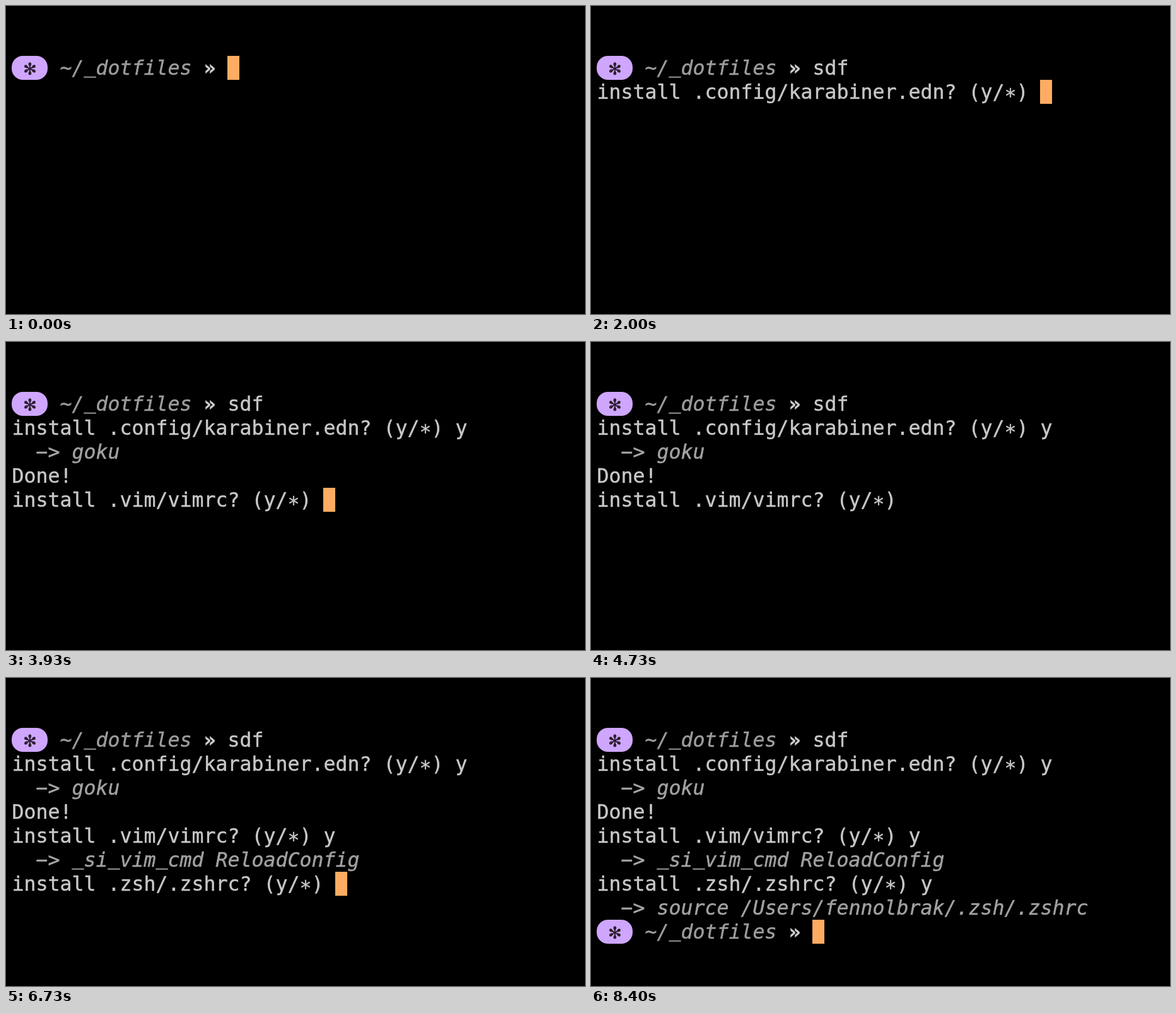
These frames come from a looping animation (918 px wide and 488 px high, 8470 ms). An HTML page:

```html
<!DOCTYPE html>
<html lang="en">
<head>
<meta charset="utf-8">
<title>Terminal session</title>
<style>
  html, body { margin: 0; width: 100%; height: 100%; overflow: hidden; background: #000; }
  svg { display: block; width: 918px; height: 488px; }
  text {
    font: 31.56px "DejaVu Sans Mono", monospace;
    font-variant-ligatures: none;
    white-space: pre;
    color: #c8c8c8;
    fill: currentColor;
    stroke: currentColor;
    stroke-width: .45px;
  }
  .path { font-style: italic; color: #9d9d9d; }
  .command { font-style: italic; color: #a2a2a2; }
  .arrow { color: #a8a8a8; }
  .mark { font-weight: bold; color: #cecece; }
  .star { color: #2b1f2c; }
  .pill { fill: #cfa6fd; }
  .cursor { fill: #ffac62; }
</style>
</head>
<body>
<svg id="screen" viewBox="0 0 918 488"></svg>
<script>
const LOOP = 8470;
const KEY = 133;   // time between key presses
const IDLE = 670;  // time before a waiting cursor blinks
const CELL = { w: 19, h: 38, left: 9, top: 79, baseline: 30 };
const GLYPH_DROP = { '*': 6, '_': -3 };

const screen = document.getElementById('screen');
const cursorSteps = new Map();
let now = 0, row = 0, col = 0;

const x = () => CELL.left + col * CELL.w;
const y = () => CELL.top + row * CELL.h;

function add(tag, attrs, content = '') {
  const node = document.createElementNS('http://www.w3.org/2000/svg', tag);
  for (const name in attrs) node.setAttribute(name, attrs[name]);
  node.textContent = content;
  screen.append(node);
  return node;
}

// Plays [time, style] steps as hard changes, holding the last one to the loop's end.
function playSteps(node, steps) {
  const frames = steps.map(([time, style]) => ({ ...style, offset: time / LOOP, easing: 'step-end' }));
  frames.push({ ...steps.at(-1)[1], offset: 1 });
  node.animate(frames, { duration: LOOP, iterations: Infinity });
}

function appear(node) {
  if (now > 0) playSteps(node, [[0, { opacity: 0 }], [now, { opacity: 1 }]]);
}

function markCursor(opacity = 1) {
  cursorSteps.set(now, { opacity, transform: `translate(${x()}px, ${y()}px)` });
}

function wait(ms) {
  now += ms;
}

function blink(ms = 400) {
  markCursor(0);
  wait(ms);
  markCursor();
}

function print(content, kind = 'plain') {
  const drops = [...content].map(char => GLYPH_DROP[char] || 0);
  const dy = drops.map((drop, i) => drop - (drops[i - 1] || 0)).join(' ');
  appear(add('text', { x: x() + 0.5, y: y() + CELL.baseline, dy, class: kind }, content));
  col += content.length;
  markCursor();
}

function newline() {
  row++;
  col = 0;
  markCursor();
}

function type(keys) {
  for (const key of keys) {
    print(key);
    wait(KEY);
  }
  newline();
}

function prompt() {
  appear(add('rect', { x: x(), y: y(), width: 3 * CELL.w, height: CELL.h, rx: 18, class: 'pill' }));
  col = 1;
  print('✻', 'star');
  col = 4;
  print('~/_dotfiles', 'path');
  col = 16;
  print('»', 'mark');
  col = 18;
  markCursor();
}

function ask(file, thinking = KEY) {
  print(`install ${file}? (y/*) `);
  wait(IDLE);
  blink();
  wait(thinking);
  type('y');
}

function run(command) {
  col = 2;
  print('−>', 'arrow');
  col = 5;
  print(command, 'command');
  newline();
}

prompt();
wait(70);
blink();
wait(460);
blink(340);
type('sdf');
wait(261);

ask('.config/karabiner.edn');
run('goku');
wait(334);
blink(330);
print('Done!');
newline();

ask('.vim/vimrc');
run('_si_vim_cmd ReloadConfig');
wait(KEY);

ask('.zsh/.zshrc', 330);
run('source /Users/fennolbrak/.zsh/.zshrc');
prompt();
wait(1138);
blink(330);

const cursor = add('rect', { width: CELL.w, height: CELL.h, class: 'cursor' });
playSteps(cursor, [...cursorSteps]);
</script>
</body>
</html>
```
